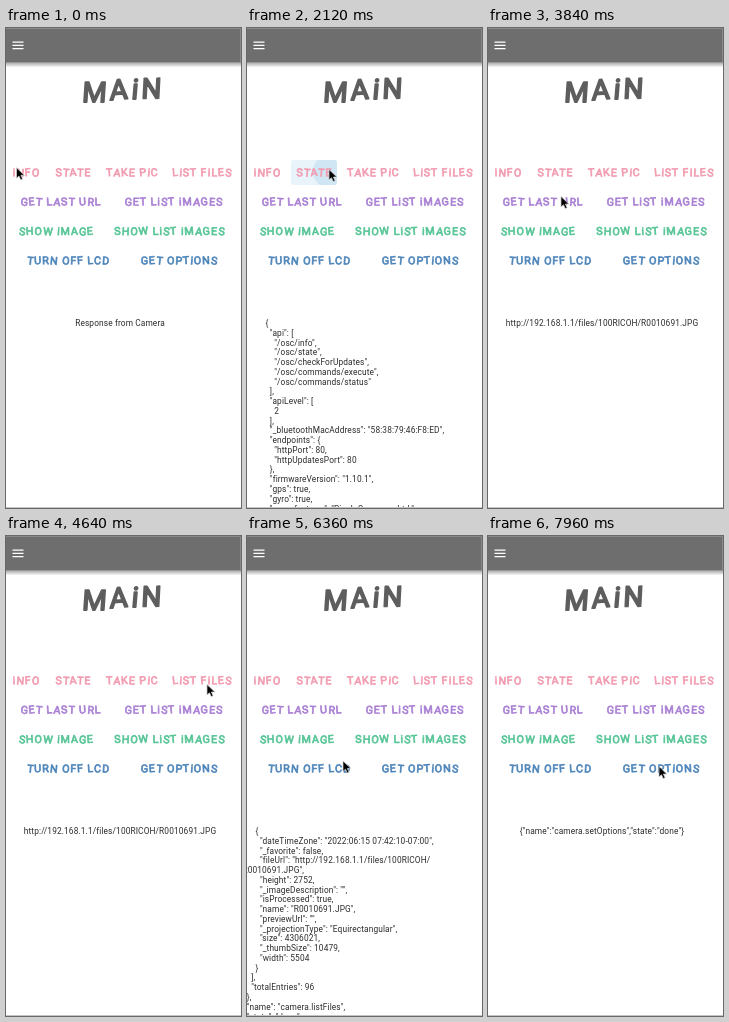
These frames come from a looping animation (235 by 480 pixels, 8 s). An HTML page:

```html
<!DOCTYPE html>
<html lang="en">
<head>
<meta charset="utf-8">
<title>Camera controls</title>
<style>
  html, body { margin: 0; width: 100%; height: 100%; overflow: hidden; background: #fff; }
  svg { position: absolute; left: 0; top: 0; }
  .lettering text {
    font-family: Roboto, sans-serif; text-anchor: middle;
    font-size: 10.8px; letter-spacing: .9px; stroke-width: .7; stroke-linejoin: round;
  }
  .lettering .title { font-size: 28px; letter-spacing: 3.2px; stroke-width: 1.8; }
  #cursor { filter: drop-shadow(.7px .9px .7px #0006); }
  #viewport { position: absolute; left: 0; top: 291px; width: 235px; height: 188px; overflow: hidden; }
  #response {
    position: absolute; margin: 0; white-space: pre; color: #2b2b2b;
    font: 8.33px/9.76px Roboto, sans-serif; letter-spacing: .12px;
  }
</style>
</head>
<body>
<div id="viewport"><pre id="response"></pre></div>
<svg width="235" height="480" viewBox="0 0 235 480">
  <defs>
    <linearGradient id="shade" x2="0" y2="1">
      <stop stop-color="#000" stop-opacity=".34"/>
      <stop offset="1" stop-color="#000" stop-opacity="0"/>
    </linearGradient>
    <clipPath id="buttonClip"><rect id="clipBox" height="25" rx="2.5"/></clipPath>
  </defs>
  <rect width="235" height="34.5" fill="#6e6e6e"/>
  <path d="M0 .5H234.5V34" fill="none" stroke="#8a8a8a"/>
  <rect y="34.5" width="235" height="5" fill="url(#shade)"/>
  <path d="M6.5 14.2h11M6.5 17.4h11M6.5 20.6h11" stroke="#fff" stroke-width="1.2"/>
  <g id="ink" clip-path="url(#buttonClip)" fill="#2f8fd0">
    <rect width="235" height="480" opacity=".11"/>
    <circle id="splash" opacity=".13"/>
  </g>
  <g class="lettering" id="labels">
    <text class="title" transform="translate(117 71.5) rotate(-3) skewX(-4)" rotate="3 -2 4 2"
      fill="#5e5e5e" stroke="#5e5e5e">MAiN</text>
  </g>
  <path d="M0 479.5H235" stroke="#c4c4c4"/>
  <path id="cursor" d="M0 0V10.4L2.5 8.2L4.2 12L6.1 11.2L4.4 7.5H7.8Z"
    fill="#000" stroke="#fff" stroke-width=".6" stroke-linejoin="round"/>
</svg>
<script>
const LOOP = 8000;
const $ = id => document.getElementById(id);
const [response, ink, splash, clipBox, cursor] =
  ['response', 'ink', 'splash', 'clipBox', 'cursor'].map($);

// Each row: baseline, colour, then label with its left and right edge
const rows = [
  [148.3, '#f29bb0', ['iNFO', 6, 34], ['STATE', 50, 84], ['TAKE PiC', 100, 152], ['LiST FiLES', 168, 224]],
  [177.6, '#aa80d4', ['GET LAST URL', 15, 94], ['GET LiST iMAGES', 120, 215]],
  [206.9, '#57c596', ['SHOW iMAGE', 14, 86], ['SHOW LiST iMAGES', 111, 216]],
  [236.2, '#4f86ba', ['TURN OFF LCD', 20, 104], ['GET OPTiONS', 135, 211]],
];
const buttons = {};
for (const [base, color, ...labels] of rows) {
  for (const [name, left, right] of labels) {
    const text = document.createElementNS('http://www.w3.org/2000/svg', 'text');
    const tilt = [...name].map((_, i) => (5 * Math.sin(i * 2.4 + left)).toFixed(1)).join(' ');
    const attrs = { x: (left + right + .9) / 2, y: base, rotate: tilt, fill: color, stroke: color };
    for (const key in attrs) text.setAttribute(key, attrs[key]);
    text.textContent = name;
    $('labels').append(text);
    buttons[name] = { x: left - 6, y: base - 16.3, width: right - left + 12 };
  }
}

const infoText = `{
  "api": [
    "/osc/info",
    "/osc/state",
    "/osc/checkForUpdates",
    "/osc/commands/execute",
    "/osc/commands/status"
  ],
  "apiLevel": [
    2
  ],
  "_bluetoothMacAddress": "58:38:79:46:F8:ED",
  "endpoints": {
    "httpPort": 80,
    "httpUpdatesPort": 80
  },
  "firmwareVersion": "1.10.1",
  "gps": true,
  "gyro": true,
  "manufacturer": "Ricoh Company, Ltd.",`;

const stateText = `{
  "fingerprint": "FIG_0091",
  "state": {
    "_apiVersion": 2,
    "_batteryInsert": true,
    "batteryLevel": 1.0,
    "_batteryState": "charged",
    "_cameraError": [
      "CANNOT_RECORDING"
    ],
    "_captureStatus": "idle",
    "_capturedPictures": 0,
    "_currentMicrophone": "Internal",
    "_currentStorage": "IN",
    "_function": "normal",
    "_latestFileUrl": "",
    "_mySettingChanged": false,
    "_pluginRunning": false,
    "_pluginWebServer": false,
    "_recordableTime": 3568,`;

const filesText = `{
  "results": {
    "entries": [
      {
        "dateTimeZone": "2022:06:15 07:42:10-07:00",
        "_favorite": false,
        "fileUrl": "http://192.168.1.1/files/100RICOH/
R0010691.JPG",
        "height": 2752,
        "_imageDescription": "",
        "isProcessed": true,
        "name": "R0010691.JPG",
        "previewUrl": "",
        "_projectionType": "Equirectangular",
        "size": 4306021,
        "_thumbSize": 10479,
        "width": 5504
      }
    ],
    "totalEntries": 96
  },
  "name": "camera.listFiles",
  "state": "done"
}`;

// start, text, left edge (centred when absent)
const responses = [
  [0, 'Response from Camera'],
  [1480, infoText, 18.5],
  [2720, stateText, 4.5],
  [3840, 'http://192.168.1.1/files/100RICOH/R0010691.JPG'],
  [5040, filesText, -4.6],
  [7240, '{"name":"camera.setOptions","state":"done"}'],
];

const presses = [
  [1080, 'iNFO'], [2020, 'STATE'], [3400, 'GET LAST URL'],
  [4740, 'LiST FiLES'], [6900, 'TURN OFF LCD'],
];

// Cursor tip: time, x, y
const path = [
  [0, 10.5, 139.8], [1720, 10.5, 139.8], [1980, 82, 141.5], [2880, 82, 141.5],
  [3200, 73, 168.5], [3960, 73, 168.5], [4280, 201, 148.5], [5200, 201, 148.5],
  [5640, 93, 310], [5800, 93, 310], [5900, 93, 281], [6000, 94.5, 246],
  [6200, 96, 225], [7300, 96, 225], [7660, 171, 230.5], [LOOP, 171, 230.5],
];

const clamp = v => Math.min(1, Math.max(0, v));
const ease = v => v * v * (3 - 2 * v);

function cursorAt(t) {
  const i = path.findIndex(p => p[0] > t);
  const [t0, x0, y0] = path[i - 1], [t1, x1, y1] = path[i];
  const k = ease((t - t0) / (t1 - t0));
  return [x0 + (x1 - x0) * k, y0 + (y1 - y0) * k];
}

function drawInk(t) {
  const press = presses.find(([start]) => t >= start && t < start + 400);
  ink.style.opacity = 0;
  if (!press) return;
  const age = t - press[0], box = buttons[press[1]], [x, y] = cursorAt(press[0]);
  for (const key in box) clipBox.setAttribute(key, box[key]);
  splash.setAttribute('cx', x);
  splash.setAttribute('cy', y + 2);
  splash.setAttribute('r', 4 + age * .12);
  ink.style.opacity = clamp(age / 80) * clamp((400 - age) / 200);
}

let shown;
function render(t) {
  const current = responses.findLast(r => r[0] <= t);
  if (current !== shown) {
    const [, text, left] = shown = current;
    response.textContent = text;
    response.style.left = left === undefined ? '114px' : left + 'px';
    response.style.translate = left === undefined ? '-50%' : 'none';
  }
  const scroll = current[1] === filesText ? 29.3 * ease(clamp((t - 5800) / 100)) : 0;
  response.style.top = -scroll + 'px';
  drawInk(t);
  cursor.setAttribute('transform', `translate(${cursorAt(t)})`);
}

const begin = performance.now();
function tick() {
  render((performance.now() - begin) % LOOP);
  requestAnimationFrame(tick);
}
tick();
</script>
</body>
</html>
```
